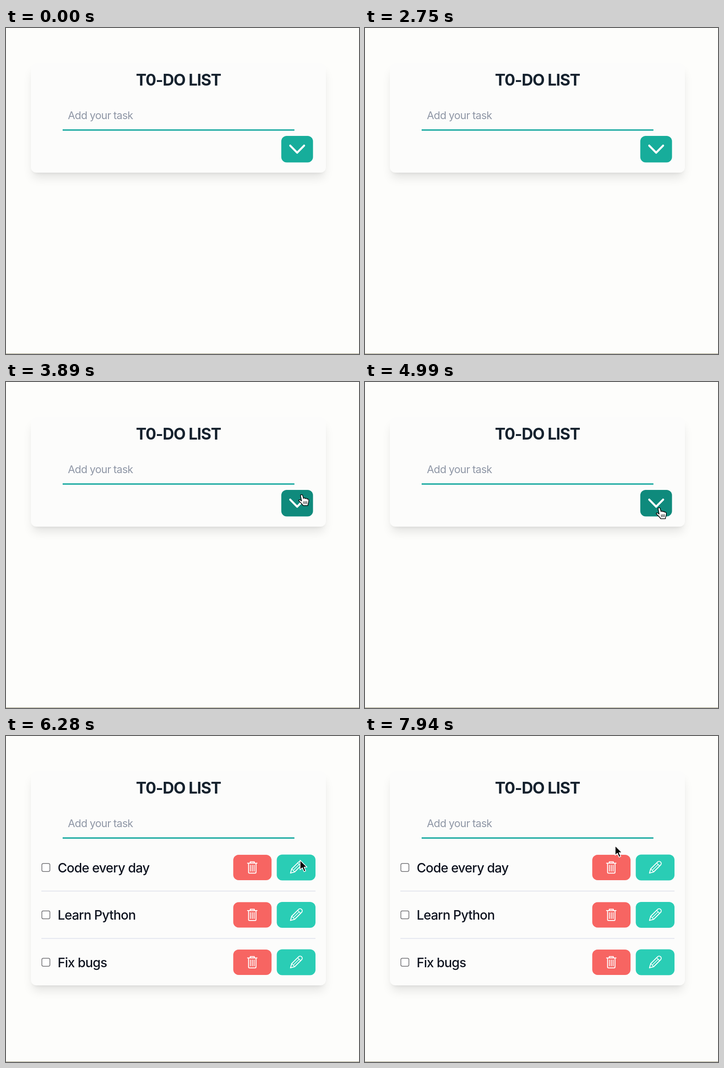
An HTML page for the animation above (8 s loop, 779x719 px).

```html
<!DOCTYPE html>
<html lang="en">
<head>
<meta charset="utf-8">
<title>To-do list</title>
<style>
html, body { margin: 0; width: 100%; height: 100%; overflow: hidden; background: #fdfdfb; }
#card {
  position: absolute; left: 55px; top: 78px; width: 651px; height: 241px;
  border-radius: 12px; background: #fcfcfb;
  box-shadow: 0 15px 22px -4px rgba(0, 0, 0, .1), 0 6px 9px -6px rgba(0, 0, 0, .1);
}
svg { position: absolute; left: 0; top: 0; display: block; }
text { font-family: Inter, "Open Sans", sans-serif; font-optical-sizing: none; }
.title { font-size: 35px; font-weight: 700; letter-spacing: -1.1px; fill: #16222e; text-anchor: middle; }
.hint { font-size: 23.3px; letter-spacing: -.7px; fill: #8f97a6; }
.task { font-size: 28.5px; font-weight: 500; letter-spacing: -.82px; fill: #0f1420; }
.icon { fill: none; stroke: #fff; stroke-width: 2; stroke-linecap: round; stroke-linejoin: round; }
</style>
</head>
<body>
<div id="card"></div>
<svg width="779" height="719" viewBox="0 0 779 719">
  <defs>
    <g id="trash" class="icon">
      <path d="M-10.5 -9.5H10.5M-4.5 -9.5V-12.5H4.5V-9.5M-8.2 -9.5V10.5Q-8.2 12.5 -6.2 12.5H6.2Q8.2 12.5 8.2 10.5V-9.5"/>
      <path d="M-4 -5V8M0 -5V8M4 -5V8" stroke-width="1.8"/>
    </g>
    <g id="pencil" class="icon" stroke-width="1.8">
      <g transform="translate(-12.2 12.4) rotate(-45)">
        <path d="M0 0L8.5 -4.7H30A4.7 4.7 0 0 1 30 4.7H8.5Z"/>
        <path d="M27 -4.7V4.7M8.5 -4.7V4.7M10 0H26" stroke-width="1.5"/>
      </g>
    </g>
  </defs>
  <rect y="718" width="779" height="1" fill="#9a9678"/>
  <text class="title" x="380.5" y="127">T0-DO LIST</text>
  <text class="hint" x="136.5" y="200.5">Add your task</text>
  <rect x="125" y="223.5" width="511.5" height="3" fill="#12a79d"/>
  <g id="opener">
    <rect id="openBtn" x="607.5" y="238" width="70" height="58.5" rx="12"/>
    <path class="icon" d="M627.3 259.5L642.5 275L657.8 259.5" style="stroke-width:4.6"/>
  </g>
  <g id="list"></g>
  <g id="cursor">
    <path id="arrow" d="M0 0V21L5 16.6L8.8 25.2L12.4 23.6L8.7 15.2H15.2Z" stroke="#fff" stroke-width="1.6" stroke-linejoin="round"/>
    <g id="hand" transform="translate(0 3)" stroke="#000" stroke-width="1.5" stroke-linejoin="round" stroke-linecap="round">
      <path fill="#fff" d="M-2.3 1.6C-2.4 -1.2 1.9 -1.4 2.6 1.2L4.4 7.8C5 6.2 8 6.2 8.6 8.2C9.5 7 12 7.4 12.6 9.4C13.8 8.6 16 9.4 16 11.4C16.4 16 14.4 18 14 23.4H3.4C1.5 19.4 -3 16.5 -6 13C-6.8 10.8 -4 9.6 -1.6 12L0 13.2Z"/>
      <path fill="none" stroke-width="1.2" d="M5 14.5L5.3 19.5M8.2 14.2L8.4 19.5M11.4 14.2V19.5"/>
    </g>
  </g>
</svg>
<script>
const LOOP = 8000, LIST_AT = 6140, HOVER_AT = 6400;
const $ = id => document.getElementById(id);
const show = (el, on) => el.setAttribute("visibility", on ? "visible" : "hidden");

// time, pointer x, pointer y
const track = [
  [2750, 781, 70], [2930, 742, 150], [3110, 690, 240], [3310, 659, 281], [3590, 659, 281],
  [3900, 652, 245], [4330, 649, 275], [5320, 649, 275], [5500, 649, 274],
  [6360, 649, 274], [6500, 646, 275], [7880, 646, 275], [7940, 552, 242]
];

$("list").innerHTML = ["Code every day", "Learn Python", "Fix bugs"].map((name, i) => `
  <g transform="translate(0 ${i * 104.5})">
    <rect x="79.2" y="281.2" width="17.6" height="17.6" rx="3" fill="#fff" stroke="#6b6b6f" stroke-width="1.5"/>
    <text class="task" x="114" y="300.5">${name}</text>
    <rect x="501.5" y="262" width="84.5" height="56" rx="12" fill="#f76562"/>
    <use href="#trash" x="543.5" y="290"/>
    <rect class="edit" x="597.5" y="261.5" width="85.5" height="57" rx="12" fill="#2acdb5"/>
    <use href="#pencil" x="640" y="290"/>
    ${i < 2 ? '<rect x="78" y="341.2" width="605" height="1.6" fill="#dfe1ec"/>' : ""}
  </g>`).join("");
const edit = document.querySelector(".edit");

function pointer(t) {
  const n = track.findIndex(k => k[0] > t);
  if (n < 0) return track[track.length - 1].slice(1);
  if (n === 0) return track[0].slice(1);
  const [t0, x0, y0] = track[n - 1], [t1, x1, y1] = track[n];
  const p = (t - t0) / (t1 - t0);
  return [x0 + (x1 - x0) * p, y0 + (y1 - y0) * p];
}

const inside = (x, y, l, t, r, b) => x >= l && x <= r && y >= t && y <= b;

function draw(t) {
  const [x, y] = pointer(t);
  const open = t >= LIST_AT;
  const overOpen = !open && inside(x, y, 608, 238, 677, 296);
  const overEdit = t >= HOVER_AT && inside(x, y, 598, 262, 683, 318);
  const hand = overOpen || overEdit;
  const seen = t > 2760;

  $("card").style.height = (open ? 472 : 241) + "px";
  show($("opener"), !open);
  show($("list"), open);
  $("openBtn").setAttribute("fill", overOpen ? "#0f8a7c" : "#17ad9b");
  edit.setAttribute("fill", overEdit ? "#5c6470" : "#2acdb5");
  $("cursor").setAttribute("transform", `translate(${x} ${y})`);
  show($("arrow"), seen && !hand);
  show($("hand"), seen && hand);
}

const start = performance.now();
function tick() {
  draw((performance.now() - start) % LOOP);
  requestAnimationFrame(tick);
}
tick();
</script>
</body>
</html>
```
